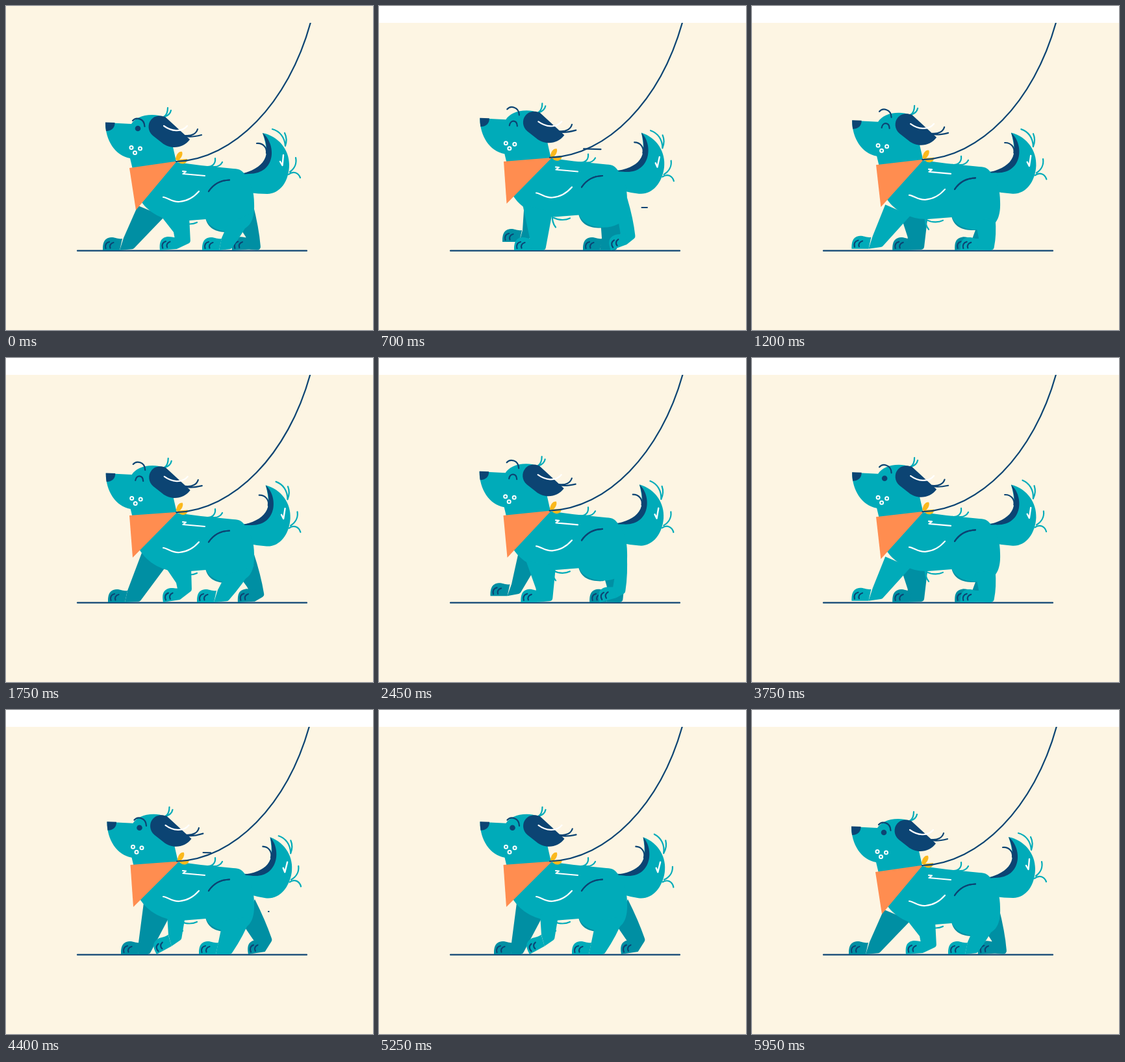
These frames come from a looping animation (565x500 px, 6 s). An HTML page with a canvas:

```html
<!DOCTYPE html>
<html lang="en">
<head>
<meta charset="utf-8">
<title>Dog walk</title>
<style>
  html, body { margin: 0; width: 100%; height: 100%; overflow: hidden; background: #fdf5e3; }
  canvas { display: block; }
</style>
</head>
<body>
<canvas id="stage" width="565" height="500"></canvas>
<script>
const ctx = document.getElementById('stage').getContext('2d');
const LOOP = 6000, STEP = 50, STRIDE = 850;
const CREAM = '#fdf5e3', TEAL = '#00abb9', DARK = '#008fa3', NAVY = '#0c4473',
      ORANGE = '#ff8d50', YELLOW = '#fbb81c', WHITE = '#fff';

// phase, toe x y, paw tilt, shin x y, front top x y, heel x y, back top x y
const FRONT = [
  [0, 149, 377, 0, 181, 358, 203, 308, 196, 375, 244, 325],
  [50, 157, 377, 0, 187, 359, 210, 298, 206, 376, 246, 322],
  [150, 177, 377, 0, 204, 359, 213, 290, 221, 377, 251, 320],
  [160, 179, 377, 0, 205, 360, 213, 295, 226, 377, 252, 322],
  [310, 208, 377, 0, 232, 358, 221, 306, 256, 377, 267, 318],
  [460, 237, 377, -.08, 258, 349, 240, 326, 284, 365, 282, 325],
  [510, 242, 377, -.15, 262, 347, 245, 322, 286, 359, 285, 322],
  [550, 253, 377, -.25, 264, 350, 244, 325, 292, 360, 284, 318],
  [610, 232, 377, -.5, 250, 347, 248, 315, 270, 354, 276, 318],
  [700, 190, 364, 0, 221, 346, 224, 300, 234, 358, 245, 315]
];
const HIND = [
  [0, 348, 377, -.05, 369, 356, 355, 335, 393, 377, 380, 305],
  [50, 357, 377, -.05, 371, 353, 358, 335, 398, 367, 381, 300],
  [85, 362, 377, -.05, 382, 357, 365, 335, 408, 367, 380, 298],
  [150, 373, 377, -.15, 381, 355, 366, 333, 410, 355, 383, 292],
  [235, 357, 377, -.35, 372, 353, 369, 335, 395, 357, 382, 296],
  [385, 302, 377, 0, 332, 358, 342, 335, 347, 375, 381, 318],
  [435, 294, 377, 0, 326, 358, 338, 335, 342, 375, 382, 320],
  [535, 297, 377, 0, 327, 358, 334, 325, 347, 377, 378, 318],
  [550, 295, 377, 0, 326, 359, 337, 335, 341, 377, 376, 320],
  [700, 314, 377, 0, 343, 358, 341, 330, 366, 377, 374, 330]
];
// phase, body drop, tail angle, scarf left x y, scarf tip x y
const BOB = [
  [0, 7, 0, 190, 250, 200, 315],
  [50, 5, .06, 190, 243, 195, 308],
  [125, 1.2, .125, 191.5, 241, 197, 306],
  [150, 0, .15, 191.5, 239, 196, 304],
  [275, .5, .115, 192, 240, 196.5, 305]
];

// Smooth periodic interpolation without overshoot.
function cycle(rows, period) {
  const n = rows.length;
  const at = (i, k) => {
    const turn = Math.floor(i / n);
    return rows[i - turn * n][k] + (k ? 0 : turn * period);
  };
  const gap = i => at(i + 1, 0) - at(i, 0);
  const rise = (i, k) => (at(i + 1, k) - at(i, k)) / gap(i);
  const slope = (i, k) => {
    const a = rise(i - 1, k), b = rise(i, k), p = gap(i - 1), q = gap(i);
    return a * b <= 0 ? 0 : 3 * (p + q) / ((2 * q + p) / a + (q + 2 * p) / b);
  };
  return t => {
    t = (t % period + period) % period;
    let i = n - 1;
    while (rows[i][0] > t) i--;
    const h = gap(i), u = (t - rows[i][0]) / h, v = 1 - u;
    return rows[0].slice(1).map((_, j) => {
      const k = j + 1;
      return at(i, k) * v * v * (1 + 2 * u) + at(i + 1, k) * u * u * (3 - 2 * u)
        + h * u * v * (slope(i, k) * v - slope(i + 1, k) * u);
    });
  };
}
const frontPose = cycle(FRONT, STRIDE), hindPose = cycle(HIND, STRIDE), bobPose = cycle(BOB, STRIDE / 2);

function fill(d, color) {
  ctx.fillStyle = color;
  ctx.fill(new Path2D(d));
}
function line(d, color, width = 2.2) {
  ctx.strokeStyle = color;
  ctx.lineWidth = width;
  ctx.stroke(new Path2D(d));
}
function dot(x, y, r, color) {
  ctx.beginPath();
  ctx.arc(x, y, r, 0, 7);
  ctx.fillStyle = color;
  ctx.fill();
}
function group(x, y, draw) {
  ctx.save();
  ctx.translate(x, y);
  draw();
  ctx.restore();
}
function spin(x, y, angle, draw) {
  group(x, y, () => {
    ctx.rotate(angle);
    ctx.translate(-x, -y);
    draw();
  });
}

function leg(pose, color, bow) {
  const [tx, ty, tilt, fx, fy, ax, ay, hx, hy, bx, by] = pose;
  const sx = tx + 26 * Math.cos(tilt), sy = ty + 26 * Math.sin(tilt);
  ctx.beginPath();
  ctx.moveTo(ax, ay);
  ctx.lineTo(fx, fy);
  ctx.lineTo(sx, sy);
  ctx.arcTo(hx, hy, bx, by, 5);
  ctx.quadraticCurveTo((hx + bx) / 2 + bow, (hy + by) / 2 + bow / 2, bx, by);
  ctx.fillStyle = color;
  ctx.fill();
  group(tx, ty, () => {
    ctx.rotate(tilt);
    fill('M0 0C0-10 1-19 13-20C20-20 22-17 30-18L26 0Z', color);
    line('M4.500-3C3-8 5-12 10-13M11.500-3.500C10-7 12-11 16.500-12', NAVY);
  });
}

function tail(drop, angle, sway) {
  group(0, (drop - 7) / 2, () => spin(376, 275, angle, () => {
    fill('M395 196C420 201 436 222 436 245C436 270 422 290 402 290Q388 290 374 288L362 258C395 256 410 240 395 196Z', TEAL);
    fill('M395 196C416 212 417 259 374 259L360 260C398 250 410 232 395 196Z', NAVY);
    line('M427 230L425.500 246L422 240', WHITE, 2.4);
    line('M386 212C395 211 402 218 401 227', NAVY);
    spin(431, 216, sway, () =>
      line('M410 190C421 193 429 202 430 216M429 196C433 204 432 210 430 216', TEAL));
    spin(436, 258, sway / 2, () =>
      line('M437 256C444 251 448 243 446 234M435 260C442 254 450 257 453 265', TEAL));
  }));
}

function torso() {
  fill('M262 234L300 239L350 244C360 244 365 248 368 254C378 266 382 280 382 298C383 320 377 331 368 336C350 346 316 342 308 322L270 325C242 325 218 312 205 290L200 240Z', TEAL);
  line('M308 241C318 242 323 236 322 228M318 241C326 242 331 238 333 234', TEAL);
  line('M272 248L277 248.500L272.500 252L306 255', WHITE);
  line('M242 288C250 289 256 296 267 295C280 294 290 287 297 279', WHITE);
  line('M312 279C318 270 328 262 344 261.500', NAVY);
}

function head(closed, lift, sway) {
  line('M243 171C248 168 249 163 249 157M244 171C250 169 253 166 254 161', TEAL);
  fill('M153 180L193 182C198 174 209 168 225 168C238 168 246 172 249 182L263 244L196 256L191 235C168 231 153 207 153 180Z', TEAL);
  fill('M153 179.500L167.500 180C168 187 163 193 154 193Q153 187 153 179.500Z', NAVY);
  fill('M245 171L283 206C273 220 253 222 240 211L226 200C218 193 218 182 223 176C228 169 237 168 245 171Z', NAVY);
  line('M243 185C254 193 270 196 279 185', WHITE);
  spin(277, 201, sway / 2, () =>
    line('M276 200C286 201 293 197 295 190M277 201C285 203 293 201 301 199', NAVY));
  if (closed) line('M198.500 191C200 182 210 182 210.500 192', NAVY);
  else dot(203, 189, 4.3, NAVY);
  group(0, -11 * lift, () => line('M195 177C200 171 213 173 213.500 186', NAVY));
  ctx.strokeStyle = WHITE;
  ctx.lineWidth = 2;
  for (const [x, y] of [[193, 218.5], [206.5, 220], [198.5, 226.5]]) {
    ctx.beginPath();
    ctx.arc(x, y, 2.5, 0, 7);
    ctx.stroke();
  }
}

// A short gust line running from x to x + length.
function gust(age, x, y, length, slant) {
  const ease = ms => {
    const u = Math.min(1, Math.max(0, ms / 260));
    return u < .5 ? 2 * u * u : 1 - 2 * (1 - u) ** 2;
  };
  const from = ease(age - 50), to = ease(age);
  if (from === to) return;
  const point = u => `${x + length * u} ${y + slant * u}`;
  line(`M${point(from)}L${point(to)}`, NAVY);
}

function draw(t) {
  const [drop, wag, lx, ly, tipX, tipY] = bobPose(t);
  const up = 1 - drop / 7;
  const sway = .1 * Math.sin(2 * Math.PI * t / 1190);
  const closed = t >= 400 && t < 3750;
  const ramp = at => Math.min(1, Math.max(0, (t - at) / 200));
  const lift = ramp(300) - ramp(3650);

  ctx.fillStyle = CREAM;
  ctx.fillRect(0, 0, 565, 500);
  ctx.lineCap = ctx.lineJoin = 'round';

  line('M110 377.700H463', NAVY);
  tail(drop, wag, sway);
  leg(hindPose(t), DARK, 3);
  leg(frontPose(t), DARK, 0);
  group(0, drop, () => {
    fill('M307 320C311 338 326 343 345 342L372 325Z', DARK);
    line('M267 320C266 330 268 336 272 341M268 326C278 331 288 330 294 327', TEAL);
    torso();
  });
  leg(hindPose(t + 385), TEAL, 3);
  leg(frontPose(t + 460), TEAL, 0);
  group(0, drop, () => line('M312 279C318 270 328 262 344 261.500', NAVY));

  group(2.5 * up, -7.2 * up, () => head(closed, lift, sway));

  const kx = 3.5 * up, ky = -6 * up;
  fill(`M${lx} ${ly}L${263 + kx} ${239.5 + ky}L${tipX} ${tipY}Z`, ORANGE);
  group(kx * .8, ky * .85, () => {
    fill('M261 237C262 229 266 224 271 225C273 230 269 235 265 239Z', YELLOW);
    fill('M265 237L279 236C279 245 268 246 264 239Z', YELLOW);
  });

  ctx.save();
  ctx.beginPath();
  ctx.rect(0, 26, 565, 474);
  ctx.clip();
  line(`M${262 + up} ${240 - 6.5 * up}C${350 + 2 * up} ${237 - 7 * up} ${435 - 2 * up} ${150 - 4 * up} ${469 - 2 * up} 25`, NAVY);
  ctx.restore();

  const wind = (t - 586 + 1875) % 1875;
  gust(wind, 303, 220, 100, 3);
  gust(wind - 47, 404, 311, 67, 0);

  if (t >= STEP) {
    ctx.fillStyle = WHITE;
    ctx.fillRect(0, 0, 565, 26);
  }
}

let start;
function tick(now) {
  start ??= now;
  draw(Math.floor((now - start) % LOOP / STEP) * STEP);
  requestAnimationFrame(tick);
}
draw(0);
requestAnimationFrame(tick);
</script>
</body>
</html>
```
